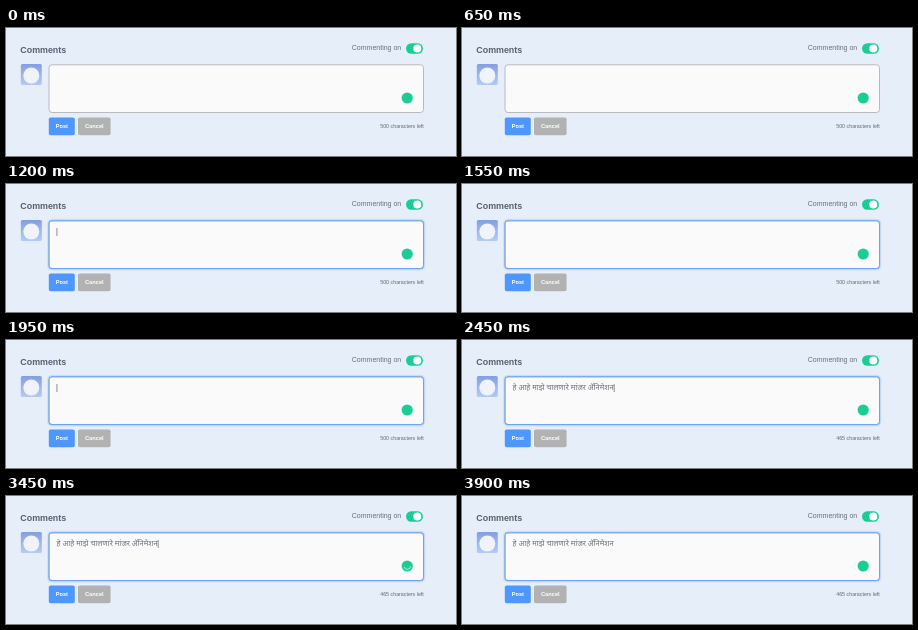
Write an HTML page with a canvas that moves like this. It is 450x128 px and loops after 3.95 s.

```html
<!DOCTYPE html>
<html lang="en">
<head>
<meta charset="utf-8">
<title>Comment box</title>
<style>
  html, body { margin: 0; width: 100%; height: 100%; overflow: hidden; background: #e6eefa; }
  canvas { display: block; width: 450px; height: 128px; }
</style>
</head>
<body>
<canvas id="stage"></canvas>
<script>
const W = 450, H = 128, LOOP = 3950;
const FOCUS = 850, PASTE = 2200, CHECK = 2500, CHECKED = 3900;
const BLINK = 500;
const SANS = '"Liberation Sans", Arial, sans-serif';
const DEVA = '"Noto Sans", "Noto Sans Devanagari", sans-serif';
const COMMENT = 'हे आहे माझे चालणारे मांजर अ\u200dॅनिमेशन';
const BLUE = '#4d97ff', GREEN = '#1bcd95';

const canvas = document.getElementById('stage');
const ctx = canvas.getContext('2d');
const dpr = window.devicePixelRatio || 1;
canvas.width = W * dpr;
canvas.height = H * dpr;
ctx.scale(dpr, dpr);

function box(x, y, w, h, r, fill) {
  ctx.beginPath();
  ctx.roundRect(x, y, w, h, r);
  if (fill) {
    ctx.fillStyle = fill;
    ctx.fill();
  }
}

function disc(x, y, r, fill) {
  ctx.beginPath();
  ctx.arc(x, y, r, 0, Math.PI * 2);
  ctx.fillStyle = fill;
  ctx.fill();
}

function text(str, x, y, font, color, align = 'left') {
  ctx.font = font;
  ctx.fillStyle = color;
  ctx.textAlign = align;
  ctx.fillText(str, x, y);
}

function header() {
  text('Comments', 14.3, 25, `bold 8.9px ${SANS}`, '#5a6070');
  text('Commenting on', 395.2, 22.1, `7px ${SANS}`, '#6a707e', 'right');
  box(400, 15.3, 17, 10.4, 5.2, GREEN);
  disc(411.3, 20.5, 4, '#fff');
}

function avatar() {
  const sky = ctx.createLinearGradient(0, 36, 0, 57);
  sky.addColorStop(0, '#839fe0');
  sky.addColorStop(1, '#b5cbf5');
  box(14.8, 36, 21, 21, 1.5, sky);
  disc(25.3, 47.5, 8, '#f0f3fa');
}

function field(focus) {
  if (focus > 0) {
    ctx.globalAlpha = focus;
    box(41, 34.8, 378.5, 51.7, 5, '#d0e1fb');
    box(42, 35.8, 376.5, 49.7, 4, '#b3d0fb');
    ctx.globalAlpha = 1;
  }
  box(43, 36.8, 374.5, 47.7, 3, '#fafafa');
  ctx.lineWidth = 1;
  ctx.strokeStyle = '#b8babd';
  ctx.stroke();
  if (focus > 0) {
    ctx.globalAlpha = focus;
    ctx.strokeStyle = '#6ca4f3';
    ctx.stroke();
    ctx.globalAlpha = 1;
  }
}

function entry(t) {
  const pasted = t >= PASTE;
  const font = `7.55px ${DEVA}`;
  let x = 50.6;
  if (pasted) {
    text(COMMENT, x, 50.2, font, '#6c717b');
    x += ctx.measureText(COMMENT).width + 0.2;
  }
  const since = t - (pasted ? PASTE : FOCUS);
  if (since >= 0 && Math.floor(since / BLINK) % 2 === 0) {
    ctx.fillStyle = '#5c6068';
    ctx.fillRect(x, 44, 0.7, 8);
  }
}

function checker(t) {
  disc(401.2, 70, 5.6, GREEN);
  if (t < CHECK || t >= CHECKED) return;
  const start = Math.PI + (t - 3050) / 800 * Math.PI * 2;
  ctx.beginPath();
  ctx.arc(401.2, 70, 3.3, start, start + Math.PI * 0.9);
  ctx.lineWidth = 0.8;
  ctx.strokeStyle = '#c9f7e5';
  ctx.stroke();
}

function footer(t) {
  box(42.8, 89.5, 26, 17.8, 1.8, BLUE);
  box(72, 89.5, 32.6, 17.8, 1.8, '#b2b2b2');
  const bold = `bold 5.7px ${SANS}`;
  text('Post', 55.8, 100.3, bold, '#fff', 'center');
  text('Cancel', 88.3, 100.3, bold, '#fff', 'center');
  const left = 500 - (t >= PASTE ? COMMENT.length : 0);
  text(`${left} characters left`, 417.8, 100.2, `5.3px ${SANS}`, '#626875', 'right');
}

function draw(now) {
  const t = now % LOOP;
  ctx.fillStyle = '#e6eefa';
  ctx.fillRect(0, 0, W, H);
  header();
  avatar();
  field(Math.min(1, Math.max(0, (t - FOCUS) / 150)));
  entry(t);
  checker(t);
  footer(t);
}

const begin = performance.now();
function tick() {
  draw(performance.now() - begin);
  requestAnimationFrame(tick);
}
tick();
</script>
</body>
</html>
```
